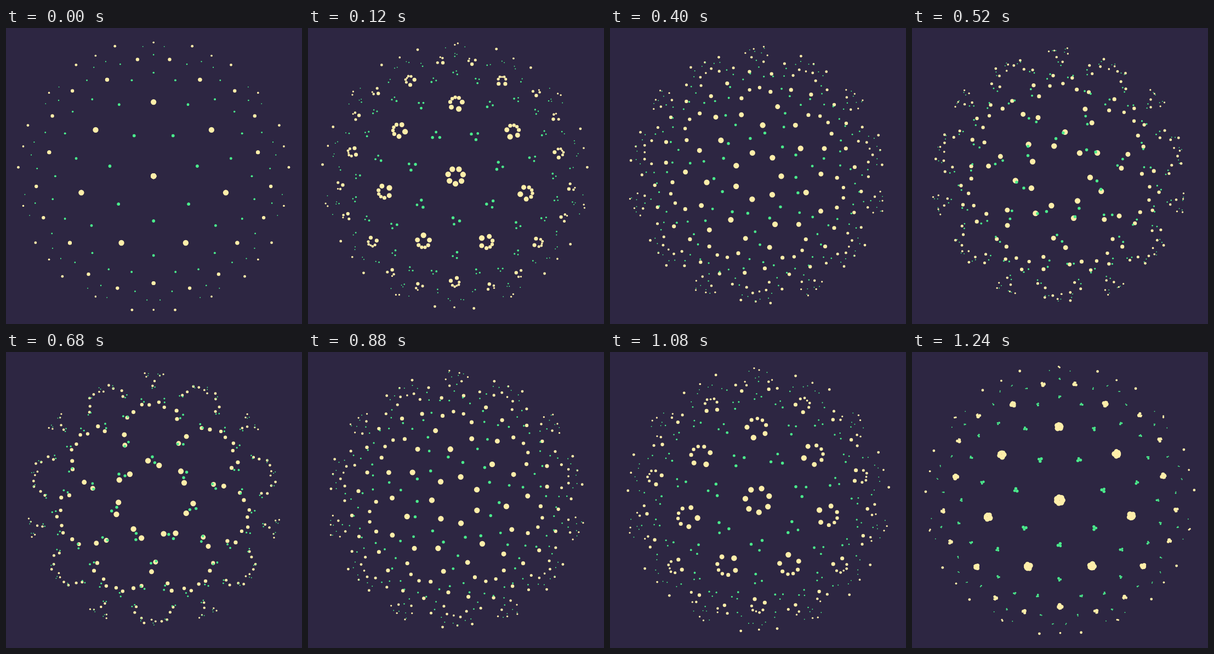
An HTML page with a canvas for the animation above (1280 ms loop, 540 px wide and 540 px high).

```html
<!DOCTYPE html>
<html lang="en">
<head>
<meta charset="utf-8">
<title>Order-7 triangular tiling</title>
<style>
  html, body { margin: 0; width: 100%; height: 100%; overflow: hidden; background: #2d2642; }
  canvas { display: block; }
</style>
</head>
<body>
<canvas id="stage" width="540" height="540"></canvas>
<script>
const ctx = document.getElementById('stage').getContext('2d');
const LOOP = 1280, STEP = 40;
const CX = 269.2, CY = 270.2, DISC = 272;
const FOLD = 7, SECTOR = 360 / FOLD, HALF = SECTOR / 2;
const BULGE = 0.15, DOT = 0.038;

// Points of the Poincaré disc: [radius, degrees clockwise from the top].
const tiling = {
  '#ffeeaa': {
    side: -1,
    points: {
      O: [0, 0], L: [0.497, 0], L2: [0.497, SECTOR], A: [0.718, HALF],
      B: [0.7896, 7.84], B2: [0.7896, -7.84], C: [0.8965, 0], E: [0.8965, HALF],
      D: [0.909, HALF - 9.15]
    },
    single: 'O-L L-L2 B-B2 A-E',
    mirrored: 'L-A L-B A-B A-D B-C'
  },
  '#4aec8c': {
    side: 1,
    points: {
      P: [0.3007, HALF], P2: [0.3007, -HALF], Q: [0.5323, HALF], S: [0.6592, HALF - 12.9],
      T: [0.6938, 0], U: [0.7829, HALF - 9.12], V: [0.8325, HALF - 3.03],
      V2: [0.8325, HALF + 3.03], W: [0.8143, 0], X: [0.872, 4.72]
    },
    single: 'P-P2 P-Q T-W V-V2',
    mirrored: 'Q-S S-T S-U U-V W-X'
  }
};

function place([r, deg], turn, flip) {
  const a = (deg * flip + turn) * Math.PI / 180;
  return [CX + DISC * r * Math.sin(a), CY - DISC * r * Math.cos(a)];
}

// Every edge carries one dot each way.
function buildRoutes({ points, single, mirrored }) {
  const routes = [];
  const add = (list, flip) => {
    for (const edge of list.split(' ')) {
      const [from, to] = edge.split('-');
      for (let k = 0; k < FOLD; k++) {
        const p = place(points[from], k * SECTOR, flip);
        const q = place(points[to], k * SECTOR, flip);
        routes.push([p, q], [q, p]);
      }
    }
  };
  add(single, 1);
  add(mirrored, 1);
  add(mirrored, -1);
  return routes;
}

const layers = Object.entries(tiling).map(([color, spec]) =>
  ({ color, side: spec.side, routes: buildRoutes(spec) }));

function draw(s) {
  ctx.fillStyle = '#2d2642';
  ctx.fillRect(0, 0, 540, 540);
  // Steady along the edge, sideways on a flat ellipse.
  const arc = BULGE * Math.sqrt(s * (1 - s));
  for (const { color, side, routes } of layers) {
    ctx.fillStyle = color;
    for (const [[x, y], [u, v]] of routes) {
      const dx = u - x, dy = v - y, off = side * arc;
      ctx.beginPath();
      ctx.arc(x + dx * s - dy * off, y + dy * s + dx * off, DOT * Math.hypot(dx, dy), 0, 2 * Math.PI);
      ctx.fill();
    }
  }
}

function frame() {
  const t = performance.now() % LOOP;
  draw(Math.floor(t / STEP) * STEP / LOOP);
  requestAnimationFrame(frame);
}
frame();
</script>
</body>
</html>
```
